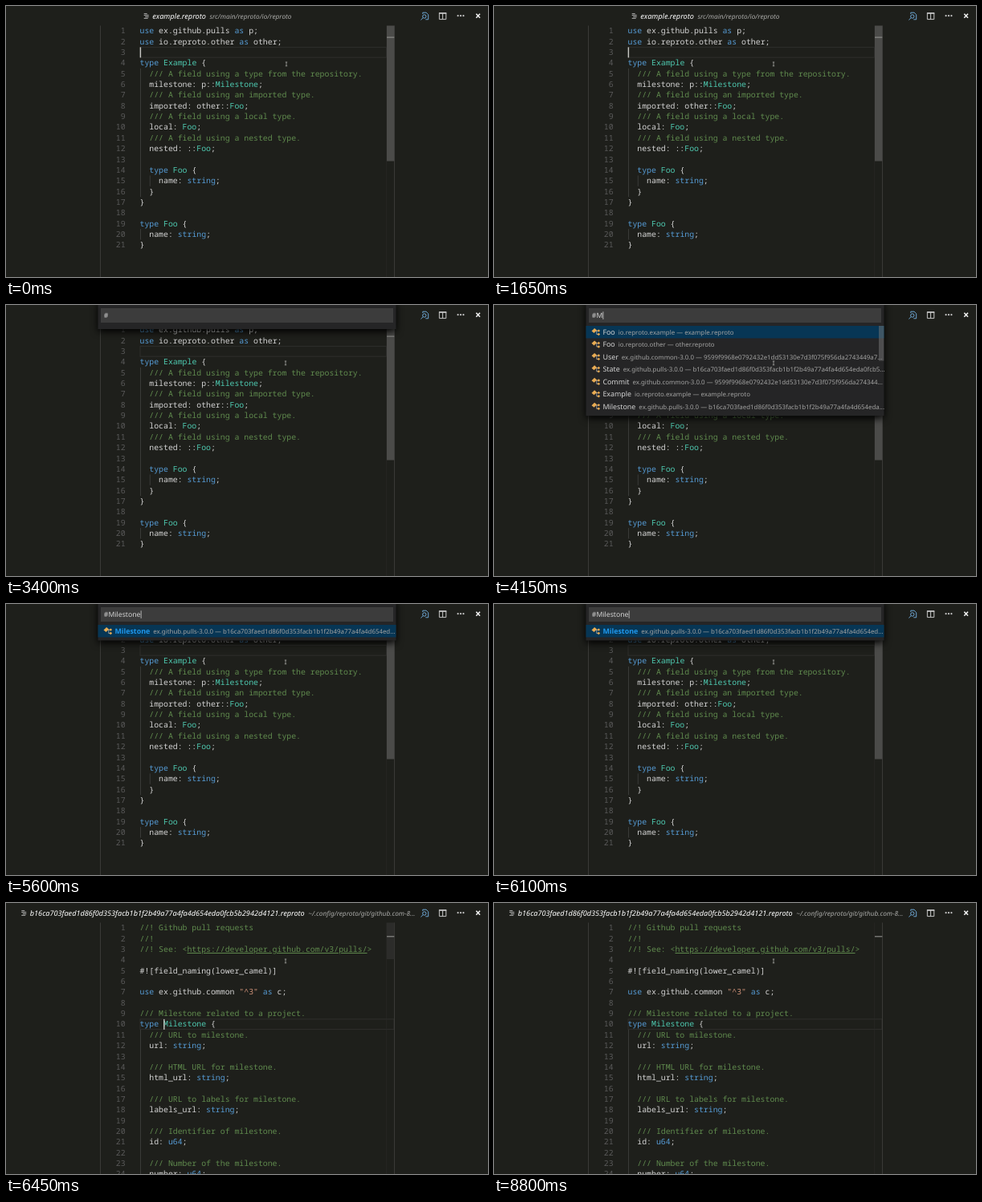
Write an HTML page that moves like this. It is 600 px wide and 338 px high and loops after 9.45 s.

```html
<!DOCTYPE html>
<html lang="en">
<head>
<meta charset="utf-8">
<title>Go to symbol</title>
<style>
html, body { margin: 0; width: 100%; height: 100%; overflow: hidden; background: #1e1f1b; }
svg { display: block; width: 100vw; height: 100vh; }
text { white-space: pre; text-rendering: geometricPrecision; fill: #d4d4d4; }
.code text { font: 9.84px "Noto Sans Mono", "DejaVu Sans Mono", monospace; }
.code .num { fill: #5a5a5a; text-anchor: end; }
.comment { fill: #608b4e; }
.string { fill: #ce9178; }
.keyword { fill: #569cd6; }
.type { fill: #4ec9b0; }
.link { text-decoration: underline .7px; text-underline-offset: 1.8px; text-decoration-skip-ink: none; }
.ui text { font: 8.9px "Noto Sans", "Open Sans", sans-serif; }
.ui .title { font-size: 9.15px; font-style: italic; fill: #fff; }
.ui .path { font-size: 8.25px; fill: #a9a9a7; }
.ui .query { font-size: 8.7px; }
.ui .desc { font-size: 7.88px; fill: #a3a3a2; }
.ui .match { font-weight: bold; fill: #1f98ee; }
.shadow { filter: drop-shadow(0 3.5px 5px #000); }
</style>
</head>
<body>
<svg viewBox="0 0 600 338" preserveAspectRatio="none"></svg>
<script>
const LOOP = 9450, OPEN = 2900, LIST = 3500, FILTER = 5600, CLOSE = 6300, JUMP = 6400, SLIDER_OFF = 7300;
const LEFT = 166.5, TOP = 24.5, CHAR = 5.904, LINE = 13.35, ROW = 15.457;
const HASH = "b16ca703faed1d86f0d353facb1b1f2b49a77a4fa4d654eda0fcb5b2942d4121";
const USER_HASH = "9599f9968e0792432e1dd53130e7d3f075f956da2743449a7";

const example = `use ex.github.pulls as p;
use io.reproto.other as other;

type Example {
  /// A field using a type from the repository.
  milestone: p::Milestone;
  /// A field using an imported type.
  imported: other::Foo;
  /// A field using a local type.
  local: Foo;
  /// A field using a nested type.
  nested: ::Foo;

  type Foo {
    name: string;
  }
}

type Foo {
  name: string;
}`;

const pulls = `//! Github pull requests
//!
//! See: <https://developer.github.com/v3/pulls/>

#![field_naming(lower_camel)]

use ex.github.common "^3" as c;

/// Milestone related to a project.
type Milestone {
  /// URL to milestone.
  url: string;

  /// HTML URL for milestone.
  html_url: string;

  /// URL to labels for milestone.
  labels_url: string;

  /// Identifier of milestone.
  id: u64;

  /// Number of the milestone.
  number: u64;`;

const symbols = [
  ["Foo", "io.reproto.example — example.reproto"],
  ["Foo", "io.reproto.other — other.reproto"],
  ["User", `ex.github.common-3.0.0 — ${USER_HASH}...`],
  ["State", `ex.github.pulls-3.0.0 — ${HASH.slice(0, 54)}...`],
  ["Commit", `ex.github.common-3.0.0 — ${USER_HASH.slice(0, 46)}...`],
  ["Example", "io.reproto.example — example.reproto"],
  ["Milestone", `ex.github.pulls-3.0.0 — ${HASH.slice(0, 49)}...`]
];
const found = [["Milestone", `ex.github.pulls-3.0.0 — ${HASH.slice(0, 48)}...`]];

const esc = s => s.replace(/&/g, "&amp;").replace(/</g, "&lt;");
const span = (cls, s) => `<tspan class="${cls}">${s}</tspan>`;
const rect = (x, y, w, h, fill, more = "") =>
  `<rect x="${x}" y="${y}" width="${w}" height="${h}" fill="${fill}" ${more}/>`;
const lineTop = n => TOP + (n - 1) * LINE;

function paint(line) {
  const token = /(\/\/[\/!].*)|("[^"]*")|\b(use|as|type|string|u64)\b|\b([A-Z]\w*)/g;
  return esc(line).replace(token, (all, comment, string, keyword) => {
    if (comment) return span("comment", all.replace(/https:[^>]+/, url => span("link", url)));
    return span(string ? "string" : keyword ? "keyword" : "type", all);
  });
}

const guide = (col, from, to) =>
  rect(167 + col * CHAR, lineTop(from), .8, (to - from + 1) * LINE, "#424240");

// Editor body: current line, indent guides, numbers and coloured text
function editor(id, source, current, width, guides) {
  const rows = source.split("\n").map((line, i) => {
    const y = 34.3 + i * LINE;
    return `<text class="num" x="148.6" y="${y}">${i + 1}</text><text x="${LEFT}" y="${y}">${paint(line)}</text>`;
  });
  return `<g id="${id}" class="code">
    ${rect(167, lineTop(current) + .2, width, LINE - .6, "none", 'stroke="#2e2e2c"')}
    ${guides.map(g => guide(...g)).join("")}${rows.join("")}</g>`;
}

function heading(id, x, name, path) {
  const bars = [[0, 4], [0, 6], [1.5, 4.5], [0, 5]];
  return `<g id="${id}" class="ui">
    ${bars.map(([dx, w], i) => rect(x + dx, 9.2 + i * 1.9, w, .9, "#c5c5c5")).join("")}
    <text class="title" x="${x + 10.5}" y="15.6">${name}<tspan class="path" dx="4.5">${path}</tspan></text></g>`;
}

function symbolIcon(y) {
  return `<g transform="translate(121.5 ${y})">
    <path d="M5 3.2H8.2M6.3 3.2V7.6H8.2" fill="none" stroke="#b5b5b5" stroke-width=".8"/>
    <path d="M3.6 0L6.6 2.6L3 6L0 3.4Z" fill="#e8ab53"/>
    <path d="M8.8 1.4L10.6 3.1L8.8 4.8L7 3.1ZM8.8 5.8L10.6 7.5L8.8 9.2L7 7.5Z" fill="#e8ab53"/></g>`;
}

function list(id, items, labelClass, gap) {
  const rows = items.map(([name, desc], i) => {
    const y = 26 + i * ROW;
    return `${symbolIcon(y + 3)}<text x="135.4" y="${y + 10.9}">${span(labelClass, name)}<tspan class="desc" dx="${gap}">${desc}</tspan></text>`;
  });
  return `<g id="${id}">${rect(114.5, 26, 371, ROW, "#073655")}${rows.join("")}</g>`;
}

function toolbar() {
  return `<g fill="none" stroke="#c5c5c5">
    <g stroke="#75b4e6" stroke-width=".9"><path d="M518.8 10V8.2H523L525.7 10.8V16.8H522.3"/>
    <circle cx="520.8" cy="13" r="2.2"/><path d="M519.2 14.7L516.4 17.4"/></g>
    <path d="M539.4 9V16.6H547.8V9M543.6 9V16.6"/><path d="M538.9 9H548.3" stroke-width="1.8"/>
    <path d="M585.3 9.8L590 14.8M590 9.8L585.3 14.8" stroke="#f0f0f0" stroke-width="1.6"/></g>
    ${[562.6, 566, 569.4].map(x => `<circle cx="${x}" cy="12.2" r="1.1" fill="#c5c5c5"/>`).join("")}`;
}

document.querySelector("svg").innerHTML = `
  ${rect(0, 0, 600, 338, "#1e1f1b")}
  ${editor("doc1", example, 3, 306.5, [[0, 5, 16], [2, 15, 15], [0, 20, 20]])}
  ${editor("doc2", pulls, 10, 316, [[0, 11, 24]])}
  ${rect(117, 24.5, .8, 314, "#42423f")}
  ${rect(483.2, 24.5, .8, 314, "#42423f")}
  ${rect(473.5, 24.5, .6, 314, "#2b2b28")}
  ${rect(474, 24.5, 9.3, 169, "#4b4b49", 'id="slider"')}
  ${rect(474, 38.5, 9.3, 1.2, "#8b8b88", 'id="mark"')}
  ${rect(166.7, 51.4, 1.4, 13, "#c8c8c4", 'id="cursor"')}
  ${heading("head1", 171.7, "example.reproto", "src/main/reproto/io/reproto")}
  ${heading("head2", 19.3, HASH + ".reproto", "~/.config/reproto/git/github.com-8...")}
  ${toolbar()}
  <g id="palette" class="ui">
    ${rect(114.5, -6, 371, 36, "#252526", 'id="panel" class="shadow"')}
    ${rect(118, 4, 364, 18, "#3c3c3c")}
    <text id="query" class="query" x="121.8" y="16.2"></text>
    ${rect(0, 8.3, .8, 9.6, "#d0d0d0", 'id="caret"')}
    ${list("all", symbols, "", 4)}
    ${list("hit", found, "match", 4)}
    ${rect(479, 26, 6.3, 43.5, "#797979", 'id="thumb" fill-opacity=".5"')}
  </g>
  <path id="mouse" d="M-1.2 70H1.2M-1.2 74.8H1.2M0 70V74.8" fill="none" stroke="#b8b8b5" stroke-width=".7"/>`;

const $ = id => document.getElementById(id);
const show = (id, on) => $(id).setAttribute("visibility", on ? "inherit" : "hidden");
const set = (id, attrs) => { for (const k in attrs) $(id).setAttribute(k, attrs[k]); };
const passed = (t, times) => times.filter(x => x <= t).length;
const lit = (t, toggles) => passed(t, toggles) % 2 === 0;

const keys = [4150, 4400, 4550, 4650, 4750, 4950, 5000, 5100, 5150];
const blink1 = [150, 650, 1150, 1650, 2150, 2650, OPEN];
const blink2 = [6900, 7450, 7800, 8300, 8800];
const blinkInput = [3400, 3900, 5650, 6100];

function draw(t) {
  const jumped = t >= JUMP, open = t >= OPEN && t < CLOSE;
  const all = open && t >= LIST && t < FILTER, hit = open && t >= FILTER;

  for (const id of ["doc", "head"]) {
    show(id + 1, !jumped && !(id === "head" && open));
    show(id + 2, jumped);
  }
  show("slider", t < SLIDER_OFF);
  set("slider", jumped ? { height: 45.5, fill: "#2c2c2a" } : { height: 169, fill: "#4b4b49" });
  set("mark", { y: jumped ? 41.2 : 38.5 });
  show("cursor", lit(t, jumped ? blink2 : blink1));
  set("cursor", jumped ? { x: 196.1, y: 144.9 } : { x: 166.7, y: 51.4 });

  show("palette", open);
  show("all", all);
  show("thumb", all);
  show("hit", hit);
  const rows = all ? symbols.length : hit ? 1 : 0;
  set("panel", { height: 36 + rows * ROW });
  $("query").textContent = "#" + "Milestone".slice(0, passed(t, keys));
  set("caret", { x: 122 + $("query").getComputedTextLength() });
  show("caret", open && lit(t, blinkInput));

  set("mouse", { transform: `translate(${t < 700 ? 349 : 348} 0)` });
}

const start = performance.now();
function tick() {
  draw((performance.now() - start) % LOOP);
  requestAnimationFrame(tick);
}
tick();
</script>
</body>
</html>
```
